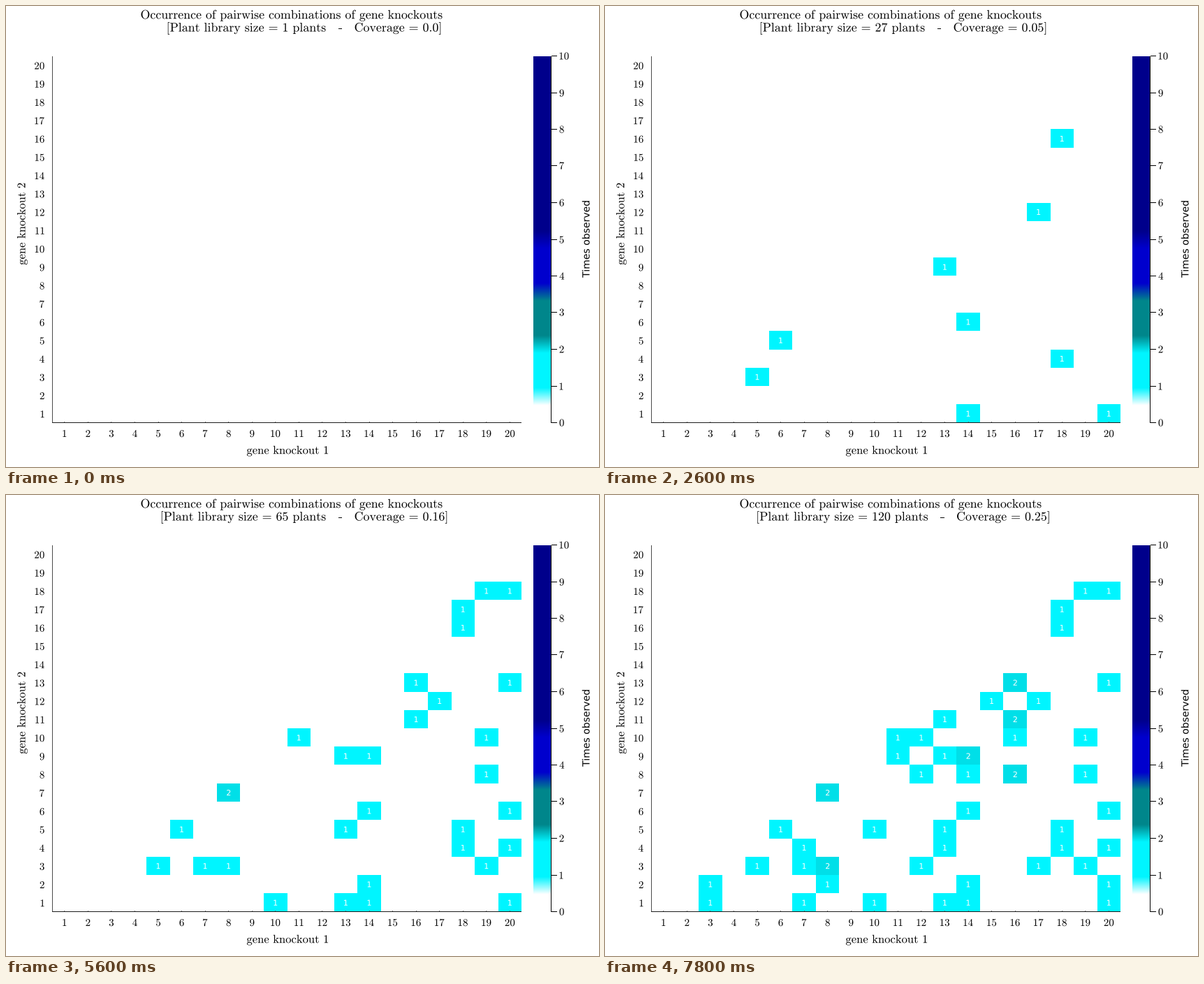
These frames come from a looping animation (849 by 660 pixels, 8000 ms). A matplotlib script:

```python
from collections import Counter

import matplotlib.pyplot as plt
import numpy as np
from matplotlib.animation import FuncAnimation
from matplotlib.patches import PathPatch, Rectangle
from matplotlib.path import Path
from matplotlib.textpath import TextPath
from matplotlib.transforms import Affine2D

W, H, DPI = 849, 660, 64
FRAMES, STEP_MS = 40, 200
GENES = 20
X0, Y0, CELL_W, CELL_H = 67, 596.5, 33.56, 26.25
BAR_STEP = 52.5
TITLE, GUIDE, TICK = 17.9, 16.6, 15

# Gene pairs in the order they are observed, and how many each step adds
PAIRS = [
    (18, 16), (14, 6), (13, 9), (17, 12), (5, 3), (20, 1), (14, 1), (6, 5),
    (18, 4), (11, 10), (20, 4), (13, 5), (19, 18), (18, 5), (7, 3), (8, 3),
    (8, 7), (13, 1), (19, 8), (10, 1), (20, 18), (20, 13), (14, 2), (16, 11),
    (8, 7), (19, 10), (18, 17), (14, 9), (20, 6), (16, 13), (19, 3), (16, 10),
    (12, 8), (14, 8), (13, 4), (3, 2), (16, 8), (13, 11), (16, 11), (16, 13),
    (14, 9), (10, 5), (7, 1), (17, 3), (8, 2), (16, 8), (12, 10), (11, 9),
    (12, 3), (15, 12), (7, 4), (8, 3), (3, 1), (20, 2),
]
ADDED = [0, 0, 1, 0, 1, 1, 1, 1, 0, 1, 1, 0, 1, 1, 1, 1, 1, 1, 1, 0,
         3, 1, 1, 1, 1, 2, 3, 3, 2, 2, 2, 2, 6, 1, 1, 2, 2, 2, 2, 1]
SEEN = np.cumsum(ADDED)
PLANTS = [*range(1, 50, 2), *range(50, 121, 5)]

WHITE, CYAN, TEAL = (255, 255, 255), (0, 245, 255), (0, 134, 139)
BLUE, NAVY = (0, 0, 205), (0, 0, 139)
STOPS = np.array([WHITE] * 2 + [CYAN] * 3 + [TEAL] * 3 + [BLUE] * 3 + [NAVY] * 11)

plt.rcParams["mathtext.fontset"] = "cm"
fig = plt.figure(figsize=(W / DPI, H / DPI), dpi=DPI, facecolor="white")
ax = fig.add_axes([0, 0, 1, 1])
shapes = {}


def shade(value):
    pos = np.linspace(0, 10, len(STOPS))
    return np.stack([np.interp(value, pos, ch) for ch in STOPS.T], axis=-1) / 255


def roman(text):
    text = text.replace(" = ", r"\hspace{0.18}=\hspace{0.18}")
    return r"$\mathrm{" + text.replace(" ", r"\hspace{0.38}") + "}$"


def shape(text, size):
    """Outline of a text with its left edge and width, kept for reuse."""
    if (text, size) not in shapes:
        path = TextPath((0, 0), text, size=size)
        xs = path.vertices[path.codes != Path.CLOSEPOLY, 0]
        shapes[text, size] = path, xs.min(), np.ptp(xs)
    return shapes[text, size]


def text_path(text, size, x, y, align=0.5, angle=0):
    """Text with its baseline at y; align 0 left, 0.5 centre, 1 right."""
    path, left, width = shape(text, size)
    move = Affine2D().translate(-left - align * width, 0).scale(1, -1)
    return move.rotate_deg(-angle).translate(x, y).transform_path(path)


def add_path(path, color="black"):
    return ax.add_artist(PathPatch(path, facecolor=color, lw=0, zorder=3))


def put(text, size, x, y, **kw):
    return add_path(text_path(text, size, x, y, **kw))


def bar(x0, y0, x1, y1, color="black", zorder=2, smooth=False):
    return ax.add_artist(Rectangle((x0, y0), x1 - x0, y1 - y0, facecolor=color,
                                   lw=0, antialiased=smooth, zorder=zorder))


def edge_x(k):
    return round(X0 + CELL_W * k)


def edge_y(k):
    return round(Y0 - CELL_H * k)


# Axes and labels
bar(66, 72, 67, 597, "#4a4a4a")
bar(66, 596, 738, 597, "#1c1c1c")
for g in range(1, GENES + 1):
    cx = X0 + CELL_W * (g - 0.5)
    cy = Y0 - CELL_H * (g - 0.5)
    bar(round(cx - 0.5), 595, round(cx + 0.5), 596, "#666666")
    put(roman(str(g)), TICK, cx, 617)
    put(roman(str(g)), TICK, 54.7, cy + 5.9, align=1)
put(roman("gene knockout 1"), GUIDE, 403, 641.3)
put(roman("gene knockout 2"), GUIDE, 27.6, 312, angle=90)
put(roman("Occurrence of pairwise combinations of gene knockouts"),
    TITLE, 409, 18.3)

# Colour bar
ax.imshow(shade(np.linspace(10, 0, 525))[:, None, :], extent=(755, 780, 597, 72),
          origin="upper", aspect="auto", interpolation="nearest")
bar(780, 72, 781, 597)
for v in range(11):
    y = round(Y0 - BAR_STEP * v - 0.5)
    bar(781, y, 789, y + 1)
    put(roman(str(v)), TICK, 792.5, y + 5.5, align=0)
put("Times observed", 14, 835.4, 334, angle=90)

# Cells, hidden until observed
cells = {}
for col, row in PAIRS:
    if (col, row) in cells:
        continue
    rect = bar(edge_x(col - 1), edge_y(row), edge_x(col), edge_y(row - 1), zorder=1)
    cx, cy = X0 + CELL_W * (col - 0.5), Y0 - CELL_H * (row - 0.5)
    digits = [text_path(str(n), 11, cx, cy + 4.3) for n in (1, 2)]
    cells[col, row] = rect, add_path(digits[0], "white"), digits

head = put(roman("["), TITLE, 0, 0)
tail = put(roman("]"), TITLE, 0, 0)
hyphen = bar(0, 31.7, 5.4, 32.9, smooth=True)


def set_title(plants, coverage):
    base, gap = 36.5, 42
    left = roman(f"[Plant library size = {plants} plants")
    right = roman(f"Coverage = {coverage}]")
    left_w, right_w = shape(left, TITLE)[2], shape(right, TITLE)[2]
    x = 427 - (left_w + gap + right_w) / 2
    head.set_path(text_path(left, TITLE, x, base, align=0))
    x += left_w
    hyphen.set_x(x + gap / 2 - 2.7)
    tail.set_path(text_path(right, TITLE, x + gap, base, align=0))


def update(i):
    counts = Counter(PAIRS[:SEEN[i]])
    for pair, (rect, label, digits) in cells.items():
        n = counts[pair]
        rect.set_visible(n > 0)
        label.set_visible(n > 0)
        if n:
            rect.set_facecolor(shade(n))
            label.set_path(digits[n - 1])
    pairs_seen = len(set(PAIRS[:SEEN[i]]))
    set_title(PLANTS[i], round(pairs_seen / (GENES * (GENES - 1) / 2), 2))


ax.set_xlim(0, W)
ax.set_ylim(H, 0)
ax.axis("off")

anim = FuncAnimation(fig, update, frames=FRAMES, interval=STEP_MS,
                     repeat=True, repeat_delay=0, blit=False)
plt.show()
```
